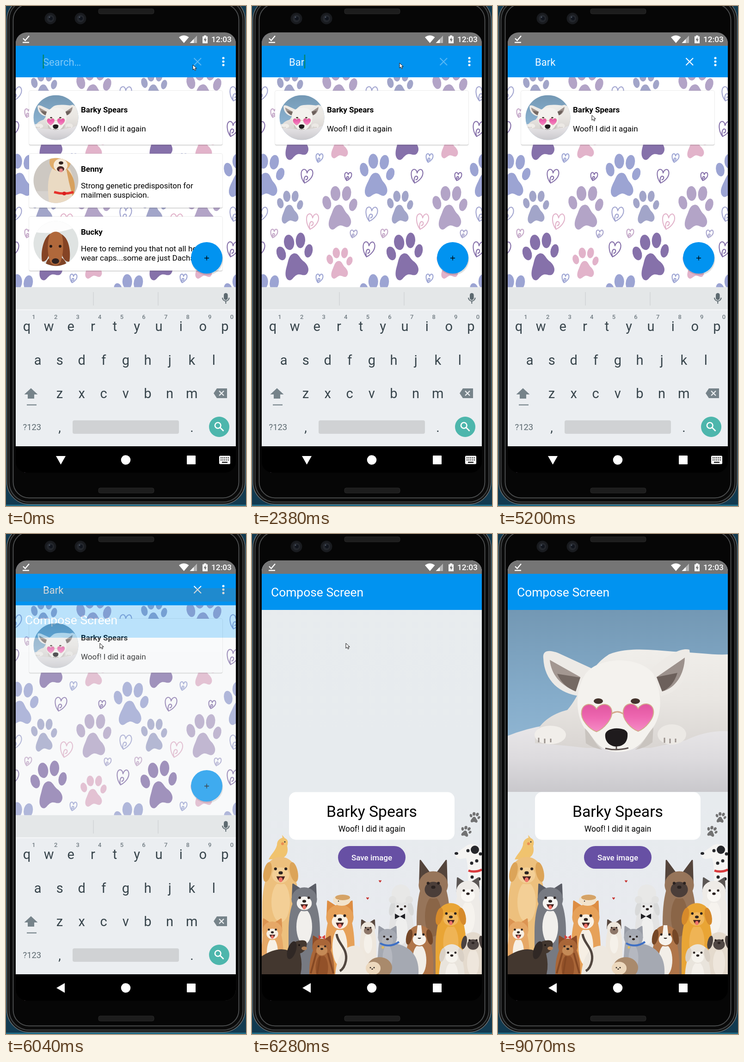
These frames come from a looping animation (519 px wide and 1080 px high, 9.87 s). An HTML page:

```html
<!DOCTYPE html>
<html lang="en">
<head>
<meta charset="utf-8">
<title>Dog search</title>
<style>
  html, body { margin: 0; width: 100%; height: 100%; overflow: hidden; background: #123a50; }
  svg { display: block; width: 100vw; height: 100vh; }
  text { font-family: Roboto, sans-serif; white-space: pre; }
  .mid { text-anchor: middle; }
  .bold { font-weight: 700; }
  .medium { font-weight: 500; }
</style>
</head>
<body>
<svg id="stage" viewBox="0 0 519 1080"></svg>
<script>
const LOOP = 9870;
const BLUE = '#0193f0';
const KEYS = '#37444b';

// ---- drawing helpers -------------------------------------------------
const rect = (x, y, w, h, fill, more = '') => `<rect x="${x}" y="${y}" width="${w}" height="${h}" fill="${fill}" ${more}/>`;
const oval = (x, y, rx, ry, fill, turn = 0) =>
  `<ellipse cx="${x}" cy="${y}" rx="${rx}" ry="${ry}" fill="${fill}" transform="rotate(${turn} ${x} ${y})"/>`;
const disc = (x, y, r, fill) => oval(x, y, r, r, fill);
const path = (d, fill, more = '') => `<path d="${d}" fill="${fill}" ${more}/>`;
const line = (d, color, width = 2, more = '') => path(d, 'none', `stroke="${color}" stroke-width="${width}" ${more}`);
const text = (x, y, size, fill, string, cls = '') =>
  `<text x="${x}" y="${y}" font-size="${size}" fill="${fill}" class="${cls}">${string}</text>`;
const group = (id, body, more = '') => `<g id="${id}" ${more}>${body}</g>`;

// ---- wallpaper -------------------------------------------------------
const paw = (x, y, w, h, fill, tilt = 0) => `<g transform="translate(${x} ${y}) scale(${w / 100} ${h / 100}) rotate(${tilt} 50 50)">` +
  oval(13, 38, 12, 16, fill, -24) + oval(38, 17, 14, 17, fill, -8) +
  oval(70, 17, 13, 17, fill, 14) + oval(89, 43, 11, 15, fill, 28) +
  path('M46 43C60 42 61 54 70 62C82 71 88 84 78 92C68 99 60 88 49 91C38 94 34 103 25 99C14 92 19 78 25 67C31 56 33 45 46 43Z', fill) + '</g>';

const curl = (x, y, w, h, color) => `<g transform="translate(${x} ${y}) scale(${w / 100} ${h / 100})">` +
  line('M-20 48C-52 16-56-36-28-44C-10-48-2-32 0-20C10-46 38-54 46-26C52 6 14 36-20 48C-30 22-20 0-4 2C12 6 4 26-10 26',
    color, 2.1, 'vector-effect="non-scaling-stroke" stroke-linecap="round" stroke-linejoin="round"') + '</g>';

const tile = [
  paw(232, 320, 75, 94, '#9ca4d3', 4), paw(54, 399, 56, 71, '#a2a5c9'),
  paw(152, 389, 75, 94, '#b3a4c7'), paw(54, 492, 78, 98, '#8671aa', -8), paw(161, 522, 56, 67, '#e2b3ca'),
  curl(119, 367, 27, 32, '#8671aa'), curl(208, 368, 16, 19, '#8671aa'), curl(146, 328, 16, 20, '#9ca4d3'),
  curl(131, 465, 28, 36, '#e2b3ca'), curl(259, 449, 27, 33, '#a2a5d0'), curl(48, 491, 16, 20, '#c5a9c9'),
  curl(220, 492, 16, 18, '#a9a6ce'), curl(253, 525, 27, 35, '#8671aa')
].join('');

let wallpaper = rect(21, 154, 476, 797, '#fff');
for (const dx of [-238, 0, 238])
  for (const dy of [-260, 0, 260, 520]) wallpaper += `<use href="#tile" x="${dx}" y="${dy}"/>`;

// ---- pet portraits ---------------------------------------------------
const lens = (x, y) => path('M0 31C-14 26-36 6-32-14C-28-32-8-32 0-18C8-32 30-32 33-14C36 4 14 26 0 31Z', 'url(#pink)',
  `transform="translate(${x} ${y})" stroke="#d3a98c" stroke-width="2"`);

const portrait = rect(21, 164, 476, 393, 'url(#sky)') +
  path('M21 436Q60 420 110 412L390 420Q450 408 497 412V557H21Z', 'url(#blanket)') +
  path('M80 440C86 408 118 388 150 380C178 350 190 292 240 260C280 244 330 250 380 254C430 256 470 262 497 260V426Q450 424 405 446L330 462H190Q140 456 80 452Z', 'url(#fur)') +
  path('M98 268C96 250 112 250 130 257L215 296L176 350C135 345 100 318 98 268Z', '#edeae6') +
  path('M112 272L178 309L168 340C134 326 115 303 112 272Z', '#a39791') + path('M128 302L178 310L168 340C148 332 136 320 128 302Z', '#756963') +
  path('M327 297C360 264 396 244 414 250C420 290 400 342 352 350Z', '#edeae6') +
  path('M343 309L404 267C403 303 384 333 355 340Z', '#9c918c') + path('M343 309L388 300C382 320 370 334 355 340Z', '#6c605b') +
  path('M188 304C214 264 306 262 336 302C352 336 358 380 338 414C316 440 310 470 258 471C212 468 210 440 186 418C166 386 168 336 188 304Z', '#f4f2ee') +
  path('M188 420C206 438 210 456 226 466Q204 462 190 452Z', '#c9c4bf') + path('M336 418C318 438 314 456 296 466Q320 462 334 450Z', '#c9c4bf') +
  oval(113, 434, 34, 20, '#f1eeea') + oval(376, 433, 31, 22, '#ece9e5') +
  line('M88 440v10M101 442v10M114 442v8M360 440v11M372 442v10M384 442v8', '#9a928d', 3) +
  oval(217, 361, 10, 6, '#43322c') + oval(297, 361, 10, 6, '#43322c') +
  line('M246 388Q258 380 270 388', '#d3a98c', 3) + lens(213, 396) + lens(303, 395) +
  path('M232 432C236 416 276 416 280 430C282 452 268 459 256 459C243 459 230 449 232 432Z', '#1f1b1d') +
  line('M256 459V465M232 463Q256 469 282 462', '#5c5250', 3);

const benny = rect(59, 328, 98, 98, '#cdc8c2') + rect(59, 400, 98, 26, '#d6d2ce') +
  path('M94 430C88 390 90 365 104 345L138 352C150 375 148 400 146 430Z', '#eadac3') +
  path('M130 350C152 370 152 400 144 412L136 380Z', '#d7a15f') + oval(117, 337, 23, 20, '#e0ad6c') +
  oval(118, 344, 15, 14, '#f6ead8') + oval(119, 339, 5, 3.5, '#30211c') + oval(118, 352, 8, 6, '#4b2b28') +
  oval(119, 355, 4, 4, '#e4898a') + line('M104 402Q125 408 146 402', '#e6322b', 5) + disc(126, 405, 4, '#d9221f');

const bucky = rect(59, 464, 98, 98, '#dfe3e2') + path('M59 464H157V476Q105 496 59 488Z', '#fdfdfd') +
  path('M84 565Q88 540 106 540Q128 540 133 565Z', '#7f4325') +
  path('M96 492C82 498 74 530 78 552C92 554 96 530 96 505ZM117 492C136 498 141 530 137 552C123 555 117 530 116 505Z', '#854425') +
  path('M94 495C100 485 115 485 121 495C126 515 123 540 118 553C113 562 101 562 96 553C90 540 88 515 94 495Z', '#b0683b') +
  disc(97, 519, 3, '#261915') + disc(117, 519, 3, '#261915') + oval(107, 551, 8, 6, '#30211f');

// ---- list screen -----------------------------------------------------
const entry = (y, name, lines, photo) =>
  rect(49.5, y - .5, 419, 119, '#000', 'rx="4" opacity=".16"') + rect(50, y, 418, 116.5, '#fff', 'rx="3"') +
  `<clipPath id="round${y}"><circle cx="108" cy="${y + 58}" r="48.5"/></clipPath><g clip-path="url(#round${y})">${photo}</g>` +
  text(162, y + (lines[1] ? 39 : 47), 17, '#000', name, 'bold') +
  lines.map((s, i) => text(162, y + (lines[1] ? 75 : 88) + i * 20, 17, '#000', s)).join('');

const smallPortrait = `<g transform="translate(108 192.5) scale(.247) translate(-259 -164)">${portrait}</g>`;

const list = wallpaper +
  entry(183, 'Barky Spears', ['Woof! I did it again'], smallPortrait) +
  group('others',
    entry(319, 'Benny', ['Strong genetic predispositon for', 'mailmen suspicion.'], benny) +
    entry(455, 'Bucky', ['Here to remind you that not all heroes', 'wear caps...some are just Dachshunds.'], bucky)) +
  disc(435, 547, 34.5, 'rgba(0,0,0,.13)') + disc(434, 544, 34, BLUE) + line('M429 544.5h10M434 539.5v10', '#000', 1.3) +
  rect(21, 57, 476, 29, '#757575') + rect(21, 86, 476, 68, BLUE) +
  `<text id="query" x="80" y="129" font-size="22"></text>` + rect(79.5, 105, 2.6, 30, '#07866f', 'id="caret"') +
  line('M406.5 112.5l15.5 15.5M422 112.5l-15.5 15.5', '#fff', 2.1, 'id="clear"') +
  [112.5, 120, 127.5].map(y => disc(470, y, 2.5, '#fff')).join('');

// ---- keyboard --------------------------------------------------------
const row = (keys, x, y) => [...keys].map((k, i) => text(x + i * 47.6, y, 29, KEYS, k, 'mid')).join('');

const keyboard = rect(21, 607.5, 476, 344, '#ebeef1') + rect(21, 607.5, 476, 48, '#e4e7e8') + rect(21, 655.5, 476, 1.5, '#fafbfb') +
  rect(188.5, 618, 1, 29, '#c8cccd') + rect(328.5, 618, 1, 29, '#c8cccd') +
  rect(471, 620, 8.6, 15, '#5d6a70', 'rx="4.3"') + line('M468 630a7.3 7.3 0 0 0 14.6 0M475.3 637v6', '#5d6a70') +
  row('qwertyuiop', 45, 702) + row('asdfghjkl', 68.6, 775) + row('zxcvbnm', 116, 847) +
  [...'1234567890'].map((k, i) => text(60 + i * 47.6, 676, 13, '#717c83', k, 'mid medium')).join('') +
  path('M54 825.5L68.5 839H61V848H47V839H39.5Z', '#76838a') + rect(45, 860.5, 21, 2.2, '#76838a') +
  path('M449 836.5L456 826H478V847H456Z', '#76838a') + line('M461 831.5l10 10M471 831.5l-10 10', '#ebeef1', 2.3) +
  text(36.5, 916, 18.4, '#5d6a71', '?123') + text(116, 920, 28, KEYS, ',', 'mid') + text(402, 920, 28, KEYS, '.', 'mid') +
  rect(144, 895, 230, 29, '#d0d2d4', 'rx="4"') + disc(461, 909, 22, '#4db6ac') +
  line('M464.5 906a6.3 6.3 0 1 1-12.6 0a6.3 6.3 0 1 1 12.6 0M463 910.5l7.5 7.5', '#fff', 2.6);

// ---- animal crowd ----------------------------------------------------
const eyes = (x, y, r) => disc(x - r * .36, y - r * .12, r * .08 + .6, '#2a2220') + disc(x + r * .36, y - r * .12, r * .08 + .6, '#2a2220') +
  oval(x, y + r * .16, r * .15, r * .11, '#2a2220');

const pricked = height => (x, y, r, c) => [-1, 1].map(s =>
  path(`M${x + s * r * .9} ${y - r * height}L${x + s * r * .95} ${y}L${x + s * r * .2} ${y - r * .75}Z`, c,
    `stroke="${c}" stroke-width="3" stroke-linejoin="round"`)).join('');
const upEars = pricked(1.2);
const tallEars = pricked(1.7);
const flopEars = (x, y, r, c) => oval(x - r * .92, y + r * .1, r * .27, r * .7, c, 12) + oval(x + r * .92, y + r * .1, r * .27, r * .7, c, -12);

function pet(x, y, r, half, coat, chest, mask, ears, earColor, tongue) {
  const shoulder = y + r * 2.6;
  return path(`M${x - half} 951V${shoulder}Q${x - half} ${y + r} ${x - r * .8} ${y}H${x + r * .8}Q${x + half} ${y + r} ${x + half} ${shoulder}V951Z`, coat) +
    oval(x, y + r * 2.2, half * .5, r * 1.4, chest) + (ears === flopEars ? '' : ears(x, y, r, earColor)) +
    oval(x, y, r * 1.02, r * .95, coat) + oval(x, y + r * .32, r * .6, r * .54, mask) + (ears === flopEars ? ears(x, y, r, earColor) : '') +
    eyes(x, y, r) + (tongue ? path(`M${x - r * .3} ${y + r * .4}H${x + r * .3}Q${x} ${y + r * 1.15} ${x - r * .3} ${y + r * .4}Z`, '#46211f') +
    oval(x, y + r * .64, r * .14, r * .17, '#ee7468') : '');
}

const heart = (x, y) => path(`M${x} ${y + 3}l-3-4q1-3 3 0q2-3 3 0z`, '#c62f2c');

const crowd =
  path('M36 703C42 690 50 686 54 672C54 662 60 658 66 656L65 650L71 657C79 660 78 668 76 674C80 690 72 700 60 702Z', '#f0c36e') + disc(71, 665, 1.5, '#333') + disc(66, 669, 3, '#e98c52') +
  pet(62, 727, 31, 40, '#edc07d', '#f3cf96', '#f3cf96', flopEars, '#dca458', true) +
  pet(392, 758, 31, 36, '#97755a', '#8a6547', '#4b3e39', tallEars, '#54443b') +
  path('M463 700C470 725 464 740 470 760H497V680Q480 665 466 672L440 690Q438 700 450 702Z', '#f5f4f2') + disc(482, 682, 9, '#26272b') +
  [[467, 684], [486, 706], [491, 745], [476, 741], [475, 711], [494, 691]].map(([x, y]) => disc(x, y, 3.5, '#26272b')).join('') +
  oval(442, 690, 4, 3, '#26272b') + line('M468 727Q482 732 497 725', '#d93b3e', 5) +
  pet(113, 789, 27, 34, '#777a82', '#f1efec', '#f6f4f1', upEars, '#5b5d66', true) +
  pet(467, 773, 25, 30, '#eeebe7', '#f6f3ee', '#faf8f4', upEars, '#5b5654') +
  pet(323, 807, 22, 27, '#e3e3e3', '#efefee', '#ececec', flopEars, '#d8d9d9') + disc(322, 777, 20, '#e8e8e7') + disc(304, 790, 8, '#e2e2e1') + disc(340, 790, 8, '#e2e2e1') +
  path('M320 826L309 820V832ZM320 826L331 820V832Z', '#202024') +
  pet(430, 823, 27, 33, '#e9a535', '#efb455', '#f0b75d', flopEars, '#d68a2b', true) +
  pet(190, 828, 29, 32, '#e6a159', '#f6efe4', '#f9f0e3', upEars, '#dd8d43', true) +
  oval(194, 791, 19, 12, '#f2e3cb') + oval(196, 785, 16, 6, '#d5a367') + disc(187, 793, 1.2, '#333') +
  pet(251, 852, 15, 18, '#eee7dd', '#f5f1ea', '#8d7668', upEars, '#58483f') +
  pet(44, 857, 21, 24, '#e6a867', '#f7f0e5', '#f8efe3', upEars, '#dc9452', true) +
  pet(362, 868, 24, 30, '#b0764a', '#f2eee8', '#f7f3ed', flopEars, '#754727') + path('M358 845H366L369 872H355Z', '#f7f3ed') +
  pet(478, 880, 21, 26, '#e4dacd', '#eee6dc', '#504744', flopEars, '#4a4240') +
  path('M21 912Q55 890 80 900L95 880Q122 872 118 890Q116 902 104 906Q110 930 105 951H21Z', '#43372f') + oval(86, 899, 9, 20, '#302825', 18) + disc(102, 888, 2, '#17110f') + oval(113, 895, 6, 4, '#b28258') +
  pet(151, 893, 20, 27, '#a96638', '#925129', '#c58a56', upEars, '#8c4c28') + line('M139 905L127 949M164 905L176 949M147 912L141 950', '#854823', 4) +
  path('M151 871L144 866V876ZM151 871L158 866V876Z', '#d4413b') +
  path('M180 951C184 905 205 885 230 890Q252 910 248 951Z', '#eee8df') + line('M183 864C185 885 208 895 203 922Q200 938 190 944', '#51463f', 5) +
  path('M268 951C270 910 275 900 280 885H312C350 893 362 920 360 951Z', '#a5a9b2') + pet(293, 872, 20, 21, '#a5a9b2', '#b5b8c0', '#b1b4bb', upEars, '#989ca6') +
  line('M277 884Q298 895 318 881', '#3d6fc4', 4) + disc(283, 893, 2.6, '#e5bd55') +
  oval(276, 937, 27, 23, '#a98a6c') + oval(262, 938, 16, 14, '#ecd8bd') + eyes(260, 938, 11) +
  pet(432, 907, 22, 28, '#e9e4dc', '#f4f0ea', '#f6f3ed', flopEars, '#d9d0c5');

// ---- detail screen ---------------------------------------------------
const detail = rect(21, 57, 476, 894, 'url(#paper)') + rect(21, 57, 476, 29, '#757575') + rect(21, 86, 476, 78, BLUE) +
  text(41, 135, 26.4, '#fff', 'Compose Screen') +
  paw(470, 601, 23, 23, '#727273', 10) + paw(451, 631, 23, 23, '#727273', 20) + heart(277, 750) + heart(250, 787) + crowd +
  group('portrait', portrait) + rect(80, 557.5, 358, 103, '#fff', 'rx="15"') +
  text(259, 611, 33.7, '#000', 'Barky Spears', 'mid') + text(259, 643, 17.5, '#000', 'Woof! I did it again', 'mid') +
  rect(186, 674, 146, 49, '#6750a4', 'rx="24.5"') + text(259, 705, 17, '#fff', 'Save image', 'mid medium');

// ---- phone -----------------------------------------------------------
const rim = (inset, fill, stroke, width) => rect(inset, inset - 20, 519 - inset * 2, 1098 - inset * 2, fill,
  `rx="${50 - inset}" stroke="${stroke}" stroke-width="${width}"`);
const phone = rect(0, 1077, 519, 3, '#1f6a86') +
  rim(2, '#0d0e0e', '#6a6d6f', 1.6) + rim(6.5, '#0a0a0a', '#3b3d3e', 2.5) + rim(15.5, '#060606', '#4a4c4d', 2) +
  [6, 1041].map(y => rect(200, y, 120, 11, '#1d1d1d', 'rx="4" stroke="#292929"')).join('') +
  [96, 161].map(x => disc(x, 27, 12.5, '#191b1f') + disc(x, 27, 8, '#24272d') + disc(x + 1, 27, 4, '#11151d') + disc(x - 2, 24, 1.6, '#4b5563')).join('');

const status = line('M37 70l4.5 4.5L50 64.5', '#fff', 2.4) + rect(36, 77.5, 14, 2.4, '#fff') +
  path('M374 67.5Q384.5 59.5 395.5 67.5L384.7 80Z', '#fff') +
  path('M413 64V80H397.5Z', '#b5b5b5') + path('M406 71.5V80H397.5Z', '#fff') +
  path('M425 65.5H428V63.5H433V65.5H436V80.5H425Z', '#fff') + path('M431.5 67L427.5 74H430.2V78.5L434 71.8H431.5Z', '#757575') +
  text(444, 78.3, 17.3, '#fff', '12:03', 'medium');

const nav = rect(21, 951, 476, 57, '#000') + path('', '#fff', 'id="back"') + disc(259, 980.5, 10.3, '#fff') + rect(391, 971, 19, 19, '#fff', 'rx="1"') +
  group('imeIcon', rect(461, 971.5, 24, 18, '#fff', 'rx="2"') +
    line('M464 976h18M464 980.5h18', '#000', 2.2, 'stroke-dasharray="2.2 1.7"') + rect(467, 984.5, 12, 2.2, '#000'));

const fade = (id, ...stops) => `<linearGradient id="${id}" x1="0" y1="0" x2="0" y2="1">` +
  stops.map((c, i) => `<stop offset="${i / (stops.length - 1)}" stop-color="${c}"/>`).join('') + '</linearGradient>';

document.getElementById('stage').innerHTML = '<defs>' +
  fade('sky', '#7398b4', '#86adcb', '#9bbfda') + fade('blanket', '#e9e7e9', '#dddbde', '#c9c8cc') +
  fade('fur', '#f0eeea', '#e9e6e2', '#d9d5d2') + fade('pink', '#e0559f', '#ee68b1', '#f58cc6') + fade('paper', '#e8ecee', '#e7ebee', '#e8eaef') +
  `<clipPath id="screen"><rect x="21" y="57" width="476" height="951" rx="24"/></clipPath><g id="tile">${tile}</g></defs>` +
  phone + '<g clip-path="url(#screen)">' + group('list', list) + group('detail', detail) +
  group('keyboard', keyboard) + nav + status + '</g>' +
  path('M0 0V11L2.6 8.6L4.6 12.5L6.5 11.6L4.7 7.8H8.3Z', '#fff', 'id="mouse" stroke="#111" stroke-width="1"');

// ---- timeline: [start ms, values...] ---------------------------------
const tracks = {
  mouse: [[0, 404, 127], [150, 376, 126], [270, 344, 124], [390, 319, 123], [4260, 258, 197], [4380, 242, 218], [4500, 232, 231],
    [4650, 204, 236], [4800, 203, 236], [6550, 210, 232], [6700, 210, 234], [6840, 240, 325], [6970, 280, 432], [7260, 352, 546],
    [7390, 413, 640], [7550, 431, 697], [7690, 412, 757], [7820, 397, 799], [8270, 455, 940], [8550, 457, 940],
    [8700, 503, 1052], [8950, 503, 1055], [9070, -30, -30]],
  query: [[0, ''], [1700, 'B'], [1980, 'Ba'], [2380, 'Bar'], [2790, 'Bark']],
  caret: [[0, 1], [540, 0], [1160, 1], [3220, 0], [3750, 1], [4260, 0], [4650, 1], [5200, 0]],
  clear: [[0, .34], [5200, 1]],
  others: [[0, 1], [2380, 0]],
  detail: [[0, 0, 60], [6040, .27, 60], [6160, .88, 14], [6280, 1, 0]],
  keyboard: [[0, 1], [6160, 0]],
  imeIcon: [[0, 1], [6040, 0]],
  portrait: [[0, 0], [6400, 1]]
};
const el = Object.fromEntries([...Object.keys(tracks), 'back'].map(id => [id, document.getElementById(id)]));
const at = (name, t) => tracks[name].findLast(step => step[0] <= t).slice(1);

function draw(t) {
  for (const id of ['caret', 'clear', 'others', 'detail', 'keyboard', 'imeIcon', 'portrait'])
    el[id].setAttribute('opacity', at(id, t)[0]);
  el.mouse.setAttribute('transform', `translate(${at('mouse', t).join(' ')})`);
  el.detail.setAttribute('transform', `translate(0 ${at('detail', t)[1]})`);
  const [typed] = at('query', t);
  el.query.textContent = typed || 'Search…';
  el.query.setAttribute('fill', typed ? '#f2f9fe' : '#80c9f8');
  el.caret.setAttribute('x', 79.5 + (typed ? el.query.getComputedTextLength() : 0));
  el.back.setAttribute('d', t < 6040 ? 'M108 972H129L118.5 990.5Z' : 'M109 980.5L127 970V991Z');
}

const start = performance.now();
function tick() {
  draw((performance.now() - start) % LOOP);
  requestAnimationFrame(tick);
}
tick();
</script>
</body>
</html>
```
